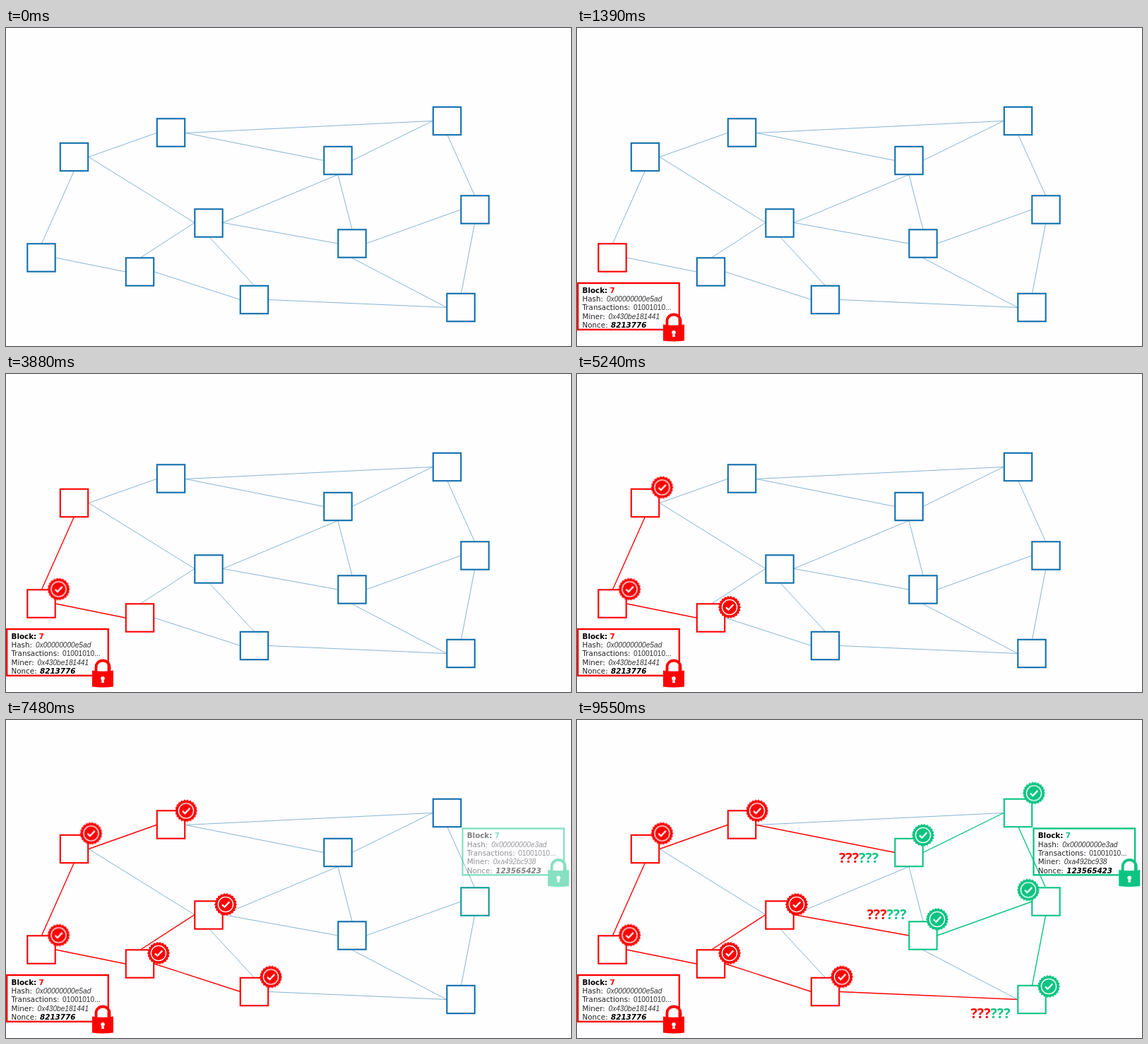
Recreate the animation shown at these times as an HTML page. Size 800 by 450 pixels, loop 9.85 s.

```html
<!DOCTYPE html>
<html lang="en">
<head>
<meta charset="utf-8">
<title>Competing blocks</title>
<style>
html, body { margin: 0; width: 100%; height: 100%; overflow: hidden; background: #fefdff; }
svg { display: block; width: 800px; height: 450px; }
text { font: 10.35px "DejaVu Sans", sans-serif; fill: #222; white-space: pre; }
.bold { font-weight: bold; fill: #000; }
.value { font: 10.15px "Liberation Sans", Arial, sans-serif; fill: #333; }
.slant { font-style: italic; }
.doubt { font: bold 19.6px "Noto Sans", "Open Sans", sans-serif; text-anchor: middle; }
</style>
</head>
<body>
<svg id="stage" viewBox="0 0 800 450"></svg>
<script>
const LOOP = 9850;
const BLUE = '#0f6fae', PALE = '#80b2d0', RED = '#ff0000', GREEN = '#0bc482', PAPER = '#fefdff';
const stage = document.getElementById('stage');

// start and end of each fade, with its colour
const waves = {
  redBlock: [790, 1390, RED],
  redSeal: [2030, 2330, RED],
  redNear: [3150, 3390, RED],
  redNearSeal: [4240, 4360, RED],
  redFar: [5240, 5550, RED],
  redFarSeal: [6240, 6360, RED],
  greenBlock: [7120, 7850, GREEN],
  greenSeal: [8000, 8120, GREEN],
  greenNear: [8240, 8390, GREEN],
  clash: [9150, 9550, GREEN],
  redClash: [9150, 9550, RED]
};

// centre, recolour wave, seal wave, seal centre
const nodes = [
  [50, 325, 'redBlock', 'redSeal', 74.5, 304.5],
  [96.5, 182.5, 'redNear', 'redNearSeal', 120.5, 160.5],
  [189.5, 345, 'redNear', 'redNearSeal', 216, 330],
  [233.5, 148, 'redFar', 'redFarSeal', 255, 128.5],
  [287, 276, 'redFar', 'redFarSeal', 311, 261],
  [351.5, 384.5, 'redFar', 'redFarSeal', 375, 363.5],
  [664, 257, 'greenBlock', 'greenSeal', 639, 240.5],
  [624.5, 131.5, 'greenNear', 'greenNear', 647, 103.5],
  [644, 395.5, 'greenNear', 'greenNear', 668, 377],
  [470, 187.5, 'greenNear', 'clash', 490, 163],
  [490, 305, 'greenNear', 'clash', 510, 282]
];

const links = [
  [96, 203, 50.5, 305, 'redNear'],
  [70, 325, 169, 345, 'redNear'],
  [117, 182.5, 213, 148.5, 'redFar'],
  [190.5, 325, 267, 275.5, 'redFar'],
  [210, 345, 332, 384.5, 'redFar'],
  [117, 182.5, 267, 275.5],
  [288, 296, 351, 364],
  [254, 148.5, 604, 131.5],
  [254, 148.5, 450, 187.5, 'redClash'],
  [307, 275.5, 470, 305, 'redClash'],
  [372, 384.5, 624, 395.5, 'redClash'],
  [307, 275.5, 470, 207.5],
  [470, 207.5, 490, 285],
  [490, 325.5, 624, 395.5],
  [490, 187.5, 604, 131.5, 'greenNear'],
  [510, 305, 644, 257, 'greenNear'],
  [625, 151.5, 663.5, 237, 'greenNear'],
  [663.5, 277, 644.5, 375.5, 'greenNear']
];

function add(parent, tag, attrs, text) {
  const el = document.createElementNS(stage.namespaceURI, tag);
  for (const key in attrs) el.setAttribute(key, attrs[key]);
  if (text) el.textContent = text;
  return parent.appendChild(el);
}

function change(el, wave, from, to) {
  const [start, end] = waves[wave];
  el.animate([
    { ...from, offset: 0 },
    { ...from, offset: start / LOOP },
    { ...to, offset: end / LOOP },
    { ...to, offset: 1 }
  ], { duration: LOOP, iterations: Infinity });
}

function layer(wave, x = 0, y = 0) {
  const g = add(stage, 'g', { transform: `translate(${x} ${y})` });
  change(g, wave, { opacity: 0 }, { opacity: 1 });
  return g;
}

function link([x1, y1, x2, y2, wave]) {
  const el = add(stage, 'line', { x1, y1, x2, y2, stroke: PALE, 'stroke-width': 0.95 });
  if (wave) change(el, wave, { stroke: PALE, strokeWidth: '0.95px' },
    { stroke: waves[wave][2], strokeWidth: '1.35px' });
}

function node([x, y, wave]) {
  const el = add(stage, 'rect', {
    x: x - 19.7, y: y - 19.7, width: 39.4, height: 39.4,
    fill: PAPER, stroke: BLUE, 'stroke-width': 2.1
  });
  change(el, wave, { stroke: BLUE }, { stroke: waves[wave][2] });
}

function seal([, , , wave, x, y]) {
  const teeth = 22, rim = [];
  for (let i = 0; i < teeth * 2; i++) {
    const a = i * Math.PI / teeth, r = i % 2 ? 13.9 : 15.6;
    rim.push((r * Math.cos(a)).toFixed(2) + ',' + (r * Math.sin(a)).toFixed(2));
  }
  const color = waves[wave][2], g = layer(wave, x, y);
  add(g, 'polygon', { points: rim.join(' '), fill: color, stroke: color, 'stroke-width': 1, 'stroke-linejoin': 'round' });
  add(g, 'circle', { r: 10.6, fill: 'none', stroke: '#fff', 'stroke-width': 1.4 });
  add(g, 'path', { d: 'M-5 .3L-1.6 3.7L5.3-3.6', fill: 'none', stroke: '#fff', 'stroke-width': 2.3 });
}

function card(wave, x, y, hash, miner, nonce) {
  const color = waves[wave][2], g = layer(wave, x, y);
  const write = (x, y, text, cls = '', style = '') => add(g, 'text', { x, y, class: cls, style }, text);
  add(g, 'rect', { x: 1.2, y: 361, width: 143.6, height: 65.8, fill: 'none', stroke: color, 'stroke-width': 2.4 });
  write(7.5, 374.5, 'Block:', 'bold');
  write(46.5, 374.5, '7', 'bold', `fill:${color}`);
  write(7.5, 387, 'Hash:');
  write(42, 387, hash, 'value slant');
  write(7.5, 399, 'Transactions:');
  write(80, 399, '01001010...', 'value');
  write(7.5, 411.5, 'Miner:');
  write(44.5, 411.5, miner, 'value slant');
  write(7.5, 424, 'Nonce:');
  write(48, 424, nonce, 'bold slant');
  add(g, 'path', { d: 'M127.5 421V414.5a9.5 9 0 0 1 19 0V421', fill: 'none', stroke: color, 'stroke-width': 3.8 });
  add(g, 'path', { d: 'M122 419.5Q137 422 152 419.5V442.5Q137 444.5 122 442.5Z', fill: color });
  add(g, 'circle', { cx: 137, cy: 430.8, r: 2.8, fill: '#fff' });
  add(g, 'path', { d: 'M136 431h2l1 6h-4z', fill: '#fff' });
}

function doubt(x, y) {
  const el = add(layer('clash', x, y), 'text', { class: 'doubt' });
  for (const fill of [RED, GREEN]) add(el, 'tspan', { style: `fill:${fill}` }, '???');
}

links.forEach(link);
nodes.forEach(node);
card('redBlock', 0, 0, '0x00000000e5ad', '0x430be181441', '8213776');
card('greenBlock', 645.2, -207.5, '0x00000000e3ad', '0xa492bc938', '123565423');
nodes.forEach(seal);
doubt(399, 202);
doubt(438.5, 282);
doubt(585.5, 422);
</script>
</body>
</html>
```
